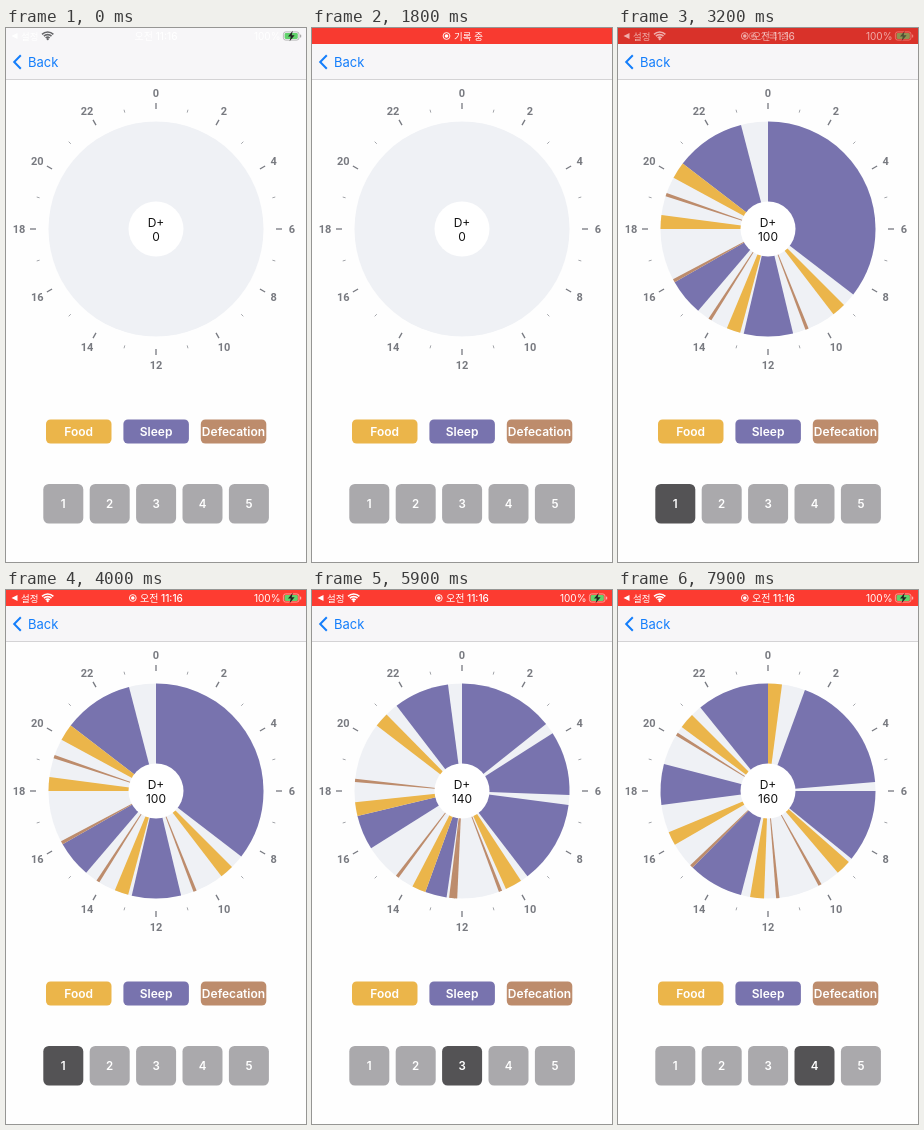
Animation of 300 by 534 pixels, one loop 8 s. Source, as an HTML page with a canvas:

```html
<!DOCTYPE html>
<html lang="ko">
<head>
<meta charset="utf-8">
<style>
html, body { margin: 0; width: 100%; height: 100%; overflow: hidden; background: #fefefe; }
canvas { display: block; width: 300px; height: 534px; }
</style>
</head>
<body>
<canvas></canvas>
<script>
const LOOP = 8000, CX = 150, CY = 201, OUTER = 107.5, HOLE = 27.5;
const FOOD = '#ebb54a', SLEEP = '#7873ae', DEFEC = '#bd8c6c';
const FONT = 'Inter, "Noto Sans CJK KR", "Noto Sans CJK", sans-serif';

// Hours of the day: sleep and food as start, end pairs; defec as single moments.
const days = [
  { at: 0, label: 0, sleep: [], food: [], defec: [] },
  { at: 2000, label: 100,
    sleep: [0, 8.5, 11.1, 12.87, 14.7, 16.02, 20.5, 23.03],
    food: [9, 9.5, 13, 13.5, 18, 18.5, 19.9, 20.5],
    defec: [10.58, 14.18, 16.08, 19.24] },
  { at: 4300, label: 120,
    sleep: [1.5, 9.5, 12, 13, 17.03, 18.1, 19.63, 20.3, 21.5, 24],
    food: [9.5, 10.04, 13, 13.48, 18.35, 18.83, 20.3, 20.85],
    defec: [10.87, 15.25, 16.03, 18.17, 19.27] },
  { at: 5700, label: 140,
    sleep: [0, 3.43, 3.83, 6.14, 6.5, 9.5, 12.55, 13.33, 15.85, 17.1, 21.5, 23.5],
    food: [9.78, 10.39, 13.33, 13.83, 17.1, 17.6, 20.5, 21.03],
    defec: [10.6, 12.23, 12.31, 12.4, 14.47, 18.38] },
  { at: 7100, label: 160,
    sleep: [1.34, 5.68, 6, 8.6, 12.97, 14.97, 17.5, 18.97, 21.4, 24],
    food: [0, 0.5, 8.75, 9.3, 12.14, 12.64, 16, 16.5, 20.44, 21],
    defec: [10.07, 11.65, 15.03, 20.13] }
];

const canvas = document.querySelector('canvas');
const ctx = canvas.getContext('2d');
const dpr = window.devicePixelRatio || 1;
canvas.width = 300 * dpr;
canvas.height = 534 * dpr;
ctx.scale(dpr, dpr);

const angle = hour => (hour / 12 - 0.5) * Math.PI;
const ramp = (t, from, to) => Math.min(1, Math.max(0, (t - from) / (to - from)));

function text(str, x, y, size, color, weight = 400, align = 'center', family = FONT) {
  ctx.font = `${weight} ${size}px ${family}`;
  ctx.textAlign = align;
  ctx.textBaseline = 'alphabetic';
  ctx.fillStyle = color;
  ctx.fillText(str, x, y);
}

function box(x, y, w, h, r, color) {
  ctx.fillStyle = color;
  ctx.beginPath();
  ctx.roundRect(x, y, w, h, r);
  ctx.fill();
}

function disc(x, y, r, color) {
  ctx.fillStyle = color;
  ctx.beginPath();
  ctx.arc(x, y, r, 0, Math.PI * 2);
  ctx.fill();
}

function line(points, color, width) {
  ctx.strokeStyle = color;
  ctx.lineWidth = width;
  ctx.beginPath();
  points.forEach(([x, y]) => ctx.lineTo(x, y));
  ctx.stroke();
}

function polygon(points, color) {
  ctx.fillStyle = color;
  ctx.beginPath();
  points.forEach(([x, y]) => ctx.lineTo(x, y));
  ctx.fill();
}

function wedge(from, to, color) {
  ctx.fillStyle = color;
  ctx.beginPath();
  ctx.moveTo(CX, CY);
  ctx.arc(CX, CY, OUTER, angle(from), angle(to));
  ctx.fill();
}

function wedges(list, color) {
  for (let i = 0; i < list.length; i += 2) wedge(list[i], list[i + 1], color);
}

function drawDial() {
  for (let h = 0; h < 24; h++) {
    const even = h % 2 === 0, c = Math.cos(angle(h)), s = Math.sin(angle(h));
    const at = r => [CX + r * c, CY + r * s];
    line([at(even ? 120 : 120.5), at(even ? 126 : 123.5)], even ? '#777980' : '#a3a5aa', even ? 1.3 : 1);
    if (even) {
      const [x, y] = at(136);
      text(h, x + (h > 12 ? -1 : 0), y + 4, 11, '#787a80', 700, 'center', 'Roboto, sans-serif');
    }
  }
}

function drawChart(day) {
  disc(CX, CY, OUTER, '#eff1f5');
  wedges(day.sleep, SLEEP);
  wedges(day.food, FOOD);
  day.defec.forEach(h => wedge(h - 0.06, h + 0.06, DEFEC));
  disc(CX, CY, HOLE, '#fff');
  text('D+', CX, 198.5, 12, '#111');
  text(day.label, CX, 212.5, 12, '#111');
}

function drawButtons(selected) {
  [['Food', FOOD], ['Sleep', SLEEP], ['Defecation', DEFEC]].forEach(([name, color], i) => {
    const x = 40 + 77.4 * i;
    box(x, 391.5, 65.5, 24, 4.5, color);
    text(name, x + 32.7, 408, 12, '#fff', 600);
  });
  for (let i = 1; i <= 5; i++) {
    const x = 37.3 + 46.4 * (i - 1);
    box(x, 456, 40, 39.5, 5.5, i === selected ? '#545355' : '#aaa9ac');
    text(i, x + 20, 480, 11.5, '#fff', 600);
  }
}

function drawWifi(color) {
  ctx.strokeStyle = color;
  ctx.lineWidth = 1.6;
  [2.8, 5.4, 8].forEach(r => {
    ctx.beginPath();
    ctx.arc(41.7, 12, r, -Math.PI * 0.75, -Math.PI * 0.25);
    ctx.stroke();
  });
  disc(41.7, 11.2, 1.1, color);
}

function drawBattery(edge) {
  ctx.strokeStyle = edge;
  ctx.lineWidth = 0.8;
  ctx.beginPath();
  ctx.roundRect(277.4, 3.9, 15.6, 8.2, 2.3);
  ctx.stroke();
  box(278.6, 5.1, 13.2, 5.8, 1.3, '#62d26c');
  box(294, 6.5, 1.2, 3, 0.6, edge);
  polygon([[286.8, 2.8], [282, 8.5], [284.8, 8.5], [283.6, 13.2], [288.6, 7.2], [285.7, 7.2]], '#222');
}

function drawRecordDot(x) {
  ctx.strokeStyle = '#fff';
  ctx.lineWidth = 0.9;
  ctx.beginPath();
  ctx.arc(x, 8, 3.4, 0, Math.PI * 2);
  ctx.stroke();
  disc(x, 8, 1.8, '#fff');
}

function drawStatusInfo(wifi, edge) {
  polygon([[5.5, 8], [11.5, 5], [11.5, 11]], '#fff');
  text('설정', 15, 11.5, 9.5, '#fff', 400, 'left');
  drawWifi(wifi);
  text('100%', 274.5, 11.7, 10, '#fff', 400, 'right');
  drawBattery(edge);
}

function drawStatus(t) {
  const red = ramp(t, 100, 400);
  if (red < 1) {
    drawStatusInfo('#66676a', '#aaa');
    text('오전 11:16', 150, 11.7, 10, '#fff', 500);
  }
  const glow = 0.5 + 0.5 * Math.cos((t - 50) / 1000 * Math.PI);
  const mix = (a, b) => Math.round(a + (b - a) * glow);
  ctx.globalAlpha = red;
  ctx.fillStyle = `rgb(${mix(215, 254)},${mix(49, 60)},${mix(42, 49)})`;
  ctx.fillRect(0, 0, 300, 16);

  const info = ramp(t, 3050, 3300);
  ctx.globalAlpha = red * (1 - info);
  drawRecordDot(134.5);
  text('기록 중', 142, 11.5, 9.5, '#fff', 400, 'left');
  ctx.globalAlpha = info;
  drawStatusInfo('#fff', '#ffb0aa');
  drawRecordDot(126.8);
  text('오전 11:16', 134, 11.7, 10, '#fff', 500, 'left');
  ctx.globalAlpha = 1;
}

function drawNav() {
  ctx.fillStyle = '#f7f6f8';
  ctx.fillRect(0, 0, 300, 51);
  ctx.fillStyle = '#c3c2c5';
  ctx.fillRect(0, 51, 300, 0.7);
  line([[14.8, 27.3], [8.2, 34], [14.8, 40.7]], '#147efb', 2);
  text('Back', 22, 38.5, 13, '#147efb', 400, 'left');
}

function draw(now) {
  const t = now % LOOP;
  const index = days.filter(d => t >= d.at).length - 1;
  ctx.fillStyle = '#fefefe';
  ctx.fillRect(0, 0, 300, 534);
  drawNav();
  drawStatus(t);
  drawDial();
  drawChart(days[index]);
  drawButtons(index);
}

const start = performance.now();
function frame() {
  draw(performance.now() - start);
  requestAnimationFrame(frame);
}
frame();
</script>
</body>
</html>
```
